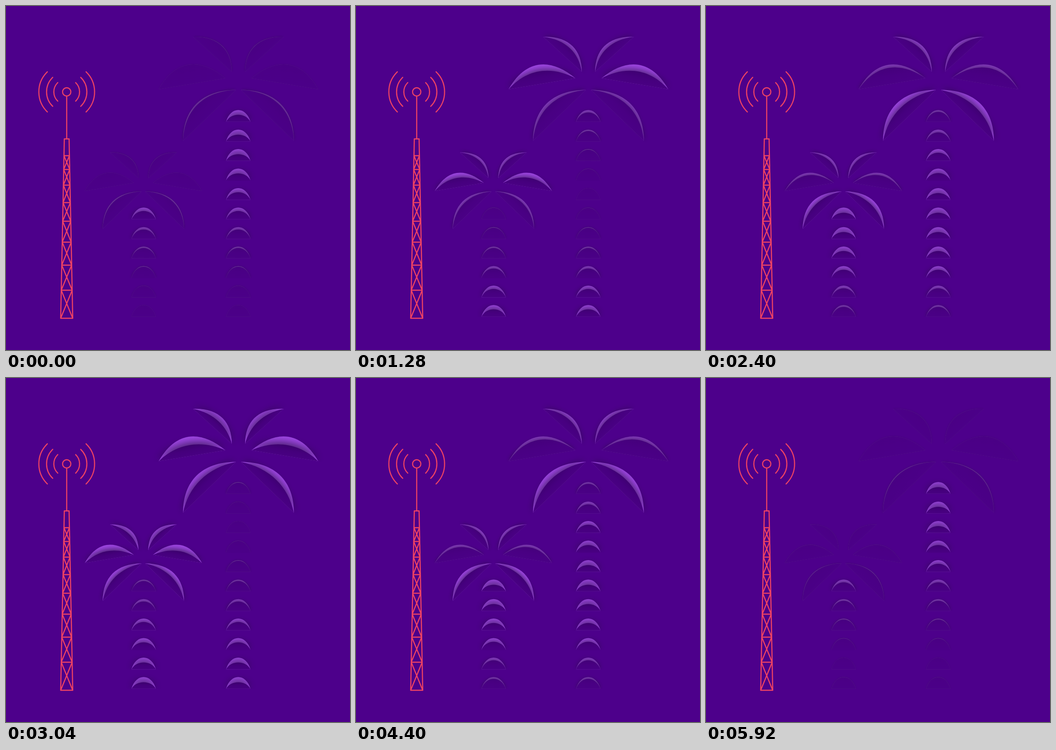
An HTML page with a canvas that plays this animation: 748 by 748 pixels, repeating every 6 s.

```html
<!DOCTYPE html>
<html lang="en">
<head>
<meta charset="utf-8">
<title>Palms and mast</title>
<style>
  html, body { margin: 0; width: 100%; height: 100%; overflow: hidden; background: #4d008b; }
  canvas { display: block; width: 748px; height: 748px; }
</style>
</head>
<body>
<canvas id="stage" width="748" height="748"></canvas>
<script>
const ctx = document.getElementById('stage').getContext('2d');
const CYCLE = 2000, STEP = 80, FOLD = 0.44;
const BG = '#4d008b', PINK = '#ee4263';

const mix = (a, b, t) => `rgb(${a.map((v, i) => Math.round(v + (b[i] - v) * t))})`;

// A flap hinged on the chord from the first to the last Bezier point.
function flap(shutAt, x0, y0, x1, y1, x2, y2, x3, y3) {
  const angle = Math.atan2(y3 - y0, x3 - x0);
  const c = Math.cos(angle), s = Math.sin(angle);
  const local = (x, y) => [(x - x0) * c + (y - y0) * s, (y - y0) * c - (x - x0) * s];
  const a = local(x1, y1), b = local(x2, y2), end = local(x3, y3);
  const shape = new Path2D();
  shape.moveTo(0, 0);
  shape.bezierCurveTo(...a, ...b, ...end);
  shape.closePath();
  return { shutAt, x: x0, y: y0, angle, shape, width: end[0], height: -0.375 * (a[1] + b[1]) };
}

// Left fronds, relative to the crown of the palm.
const fronds = [
  flap(1720, -120.5, 110, -120.5, 42, -80.5, -0.5, -5.5, -0.5),
  flap(1840, -98.5, -116, -42.5, -118, -14.5, -88, -14.5, -40),
  flap(1980, -173.5, -2, -135.5, -69.5, -80.5, -69.5, -28.5, -26)
];

// Trunk rings, numbered from the top of the tall palm.
const rings = Array.from({ length: 11 }, (_, i) => {
  const y = 251.8 + 42.4 * i;
  return flap(800 + 120 * i, -26.5, y, -17, y - 34, 17, y - 34, 26.5, y);
});

const palms = [
  { x: 505.4, y: 183, scale: 1, firstRing: 0, ringX: 505 },
  { x: 298.7, y: 403.7, scale: 0.734, firstRing: 5, ringX: 299.3 }
];

function drawFlap(f, time, size) {
  const open = (1 - Math.cos((time - f.shutAt) / CYCLE * 2 * Math.PI)) / 2;
  ctx.save();
  ctx.translate(f.x, f.y);
  ctx.rotate(f.angle);

  ctx.fillStyle = mix([98, 45, 142], [160, 70, 230], Math.min(1, open * 1.4));
  ctx.fill(f.shape);

  // No shadow falls behind the hinge.
  ctx.beginPath();
  ctx.rect(-30, -f.height - 40, f.width + 60, f.height + 40.5);
  ctx.clip();

  // The shadow leans away from the hinge.
  const m = ctx.getTransform();
  const len = Math.hypot(m.c, m.d);
  const lean = 5 * size * open;
  ctx.shadowOffsetX = -m.c / len * lean;
  ctx.shadowOffsetY = -m.d / len * lean;
  ctx.shadowBlur = size * (5 + 13 * open);
  ctx.shadowColor = `rgba(28, 14, 48, ${0.08 + 0.62 * Math.sqrt(open)})`;

  ctx.scale(1, 1 - FOLD * open);
  const shade = ctx.createLinearGradient(0, -f.height, 0, 0);
  shade.addColorStop(0, mix([74, 0, 133], [60, 0, 110], open));
  shade.addColorStop(0.5, mix([75, 0, 135], [69, 0, 124], open));
  shade.addColorStop(1, mix([75, 0, 136], [72, 0, 130], open));
  ctx.fillStyle = shade;
  ctx.fill(f.shape);
  ctx.restore();
}

function drawPalm(p, time) {
  for (const side of [1, -1]) {
    ctx.save();
    ctx.translate(p.x, p.y);
    ctx.scale(side * p.scale, p.scale);
    fronds.forEach(f => drawFlap(f, time, p.scale));
    ctx.restore();
  }
  ctx.save();
  ctx.translate(p.ringX, 0);
  rings.slice(p.firstRing).forEach(r => drawFlap(r, time, 0.9));
  ctx.restore();
}

function makeMast() {
  const mast = new Path2D();
  const cx = 132, cy = 186.7, top = 289, foot = 679;
  const spread = 46 * Math.PI / 180;
  const line = (x0, y0, x1, y1) => { mast.moveTo(x0, y0); mast.lineTo(x1, y1); };
  const half = y => 5.2 + 7.9 * (y - top) / (foot - top);
  mast.arc(cx, cy, 9, 0, 2 * Math.PI);
  for (const r of [28, 43.8, 60.6]) {
    for (const dir of [0, Math.PI]) {
      const from = dir - spread;
      mast.moveTo(cx + r * Math.cos(from), cy + r * Math.sin(from));
      mast.arc(cx, cy, r, from, dir + spread);
    }
  }
  line(cx, cy + 9, cx, top);
  mast.moveTo(cx - half(top), top);
  mast.lineTo(cx + half(top), top);
  mast.lineTo(cx + half(foot), foot);
  mast.lineTo(cx - half(foot), foot);
  mast.closePath();
  const bars = [325.5, 355.5, 389.5, 427.5, 468, 513.5, 563.5, 618, foot];
  bars.forEach((y, i) => {
    const w = half(y);
    line(cx - w, y, cx + w, y);
    if (!i) return;
    const prev = bars[i - 1], v = half(prev);
    line(cx - v, prev, cx + w, y);
    line(cx + v, prev, cx - w, y);
  });
  return mast;
}
const mast = makeMast();

function draw(time) {
  ctx.fillStyle = BG;
  ctx.fillRect(0, 0, 748, 748);
  palms.forEach(p => drawPalm(p, time));
  ctx.strokeStyle = PINK;
  ctx.lineWidth = 2.4;
  ctx.lineCap = ctx.lineJoin = 'round';
  ctx.stroke(mast);
}

const start = performance.now();
function tick() {
  const elapsed = performance.now() - start;
  draw(Math.floor(elapsed / STEP) * STEP % CYCLE);
  requestAnimationFrame(tick);
}
tick();
</script>
</body>
</html>
```
